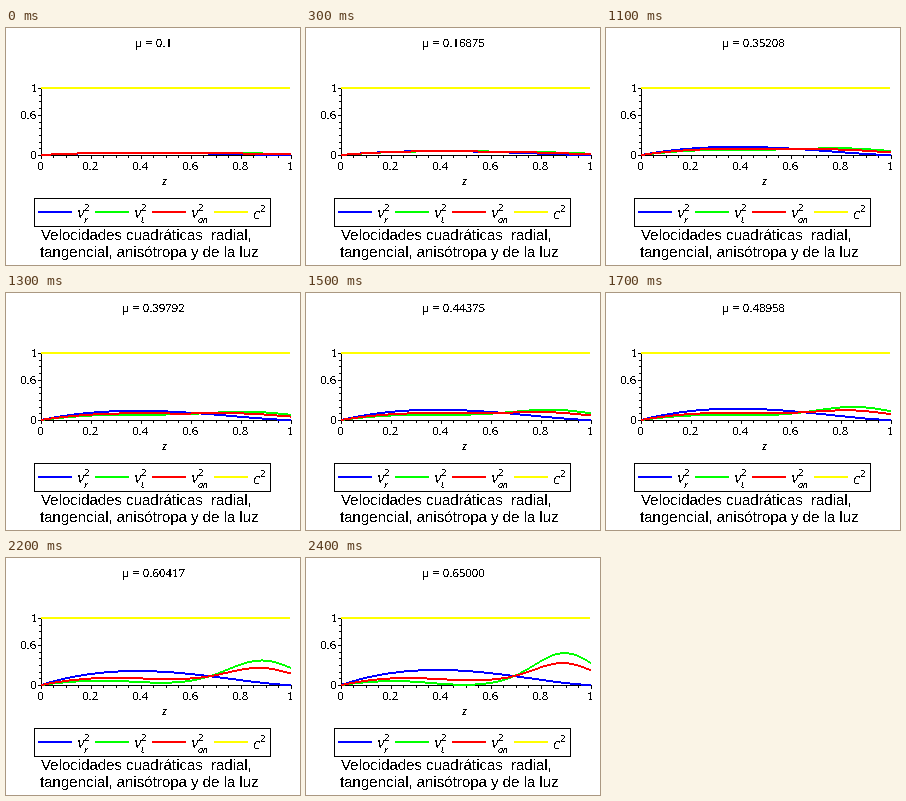
These frames come from a looping animation (294 px wide and 237 px high, 2.5 s). A matplotlib script:

```python
import numpy as np
import matplotlib.pyplot as plt
from matplotlib.animation import FuncAnimation

W, H, DPI = 294, 237, 64
FRAMES, INTERVAL = 25, 100
X0, X1, Y0, Y1 = 35, 285, 127, 60
MU_MIN, MU_MAX = 0.1, 0.65
BLUE, GREEN, RED, YELLOW = "#0000ff", "#00ff00", "#ff0000", "#ffff00"

edges = np.arange(X0, X1 + 1)
z = (edges[:-1] + 0.5 - X0) / (X1 - X0)
arch = z * (1 - z) ** 1.6
arch /= arch.max()


def bell(center, width):
    return np.exp(-((z - center) / width) ** 2 / 2)


def speeds(mu):
    """Squared radial, tangential and mean (anisotropic) speeds over z."""
    radial = 0.345 * mu * arch
    peak = 0.465 * np.exp(6 * (mu - MU_MAX))
    dip = 0.085 * np.exp(9 * (mu - MU_MAX))
    tangential = (0.093 * np.tanh(4 * mu) * arch - dip * bell(0.48, 0.15)
                  + peak * bell(0.86 + 0.14 * mu**3, 0.19 - 0.25 * mu**3))
    return radial, tangential, (radial + 2 * tangential) / 3


fig = plt.figure(figsize=(W / DPI, H / DPI), dpi=DPI, facecolor="white")
ax = fig.add_axes([0, 0, 1, 1])
ax.set_xlim(0, W)
ax.set_ylim(H, 0)
ax.axis("off")


def px(v):
    return X0 + (X1 - X0) * v


def py(v):
    return Y0 + (Y1 - Y0) * v


def stroke(x, y, color="black", width=1):
    ax.plot(x, y, color=color, lw=width * 72 / DPI, antialiased=False,
            solid_capstyle="butt", snap=True)


def label(x, y, s, size=13, ha="left", font="Liberation Serif", style="normal"):
    return ax.text(x, y, s, fontsize=size * 72 / DPI, family=font, style=style,
                   ha=ha, va="baseline", antialiased=False)


def band(v):
    """Upper and lower pixel rows of a curve two pixels thick."""
    row = np.round(py(v))
    return row - 1, row + 1


def curve(color):
    top, bottom = band(0 * z)
    return ax.stairs(top, edges, baseline=bottom, fill=True, color=color,
                     lw=0, antialiased=False, snap=True, zorder=3)


# Axes with ticks
stroke([X0, X1], [Y0, Y0])
stroke([X0, X0], [Y1, Y0])
for i in range(21):
    x = np.floor(px(i / 20))
    stroke([x, x], [Y0, Y0 + (3 if i % 4 == 0 else 2)])
for i in range(11):
    y = np.round(py(i / 10))
    stroke([X0 - (3 if i in (0, 6, 10) else 2), X0], [y, y])
for i in range(6):
    label(px(i / 5) - .5, 142, f"{i / 5:g}", ha="center")
for v in (0, 0.6, 1):
    label(31, py(v) + 4, f"{v:g}", ha="right")
label(159, 157, "z", ha="center", style="italic")

curves = [curve(c) for c in (BLUE, GREEN, RED)]
stroke([X0, X1 - 1], [Y1, Y1], YELLOW, 2)

# Legend
stroke([28, 264, 264, 28, 28], [170, 170, 198, 198, 170])
for x, base, name, sub, color in [(32, 190, "v", "r", BLUE),
                                  (89, 190, "v", "t", GREEN),
                                  (146, 190, "v", "an", RED),
                                  (208, 191, "c", "", YELLOW)]:
    stroke([x, x + 34], [184, 184], color, 2)
    label(x + 39, base, name, 17, style="italic")
    label(x + 46.5, base - 7, "2", 11)
    label(x + 45.5, base + 5, sub, 11, style="italic")

# Caption
label(35, 212, "Velocidades cuadráticas  radial,", 15, font="Liberation Sans")
label(34, 229, "tangencial, anisótropa y de la luz", 15, font="Liberation Sans")

title = label(147.5, 19, "", ha="center")


def update(k):
    mu = MU_MIN + (MU_MAX - MU_MIN) * k / (FRAMES - 1)
    title.set_text("μ = 0.1" if k == 0 else f"μ = {mu:.5f}")
    for patch, v in zip(curves, speeds(mu)):
        top, bottom = band(v)
        patch.set_data(values=top, baseline=bottom)
    return [title, *curves]


anim = FuncAnimation(fig, update, frames=FRAMES, interval=INTERVAL,
                     repeat=True, repeat_delay=0, blit=False)
plt.show()
```
